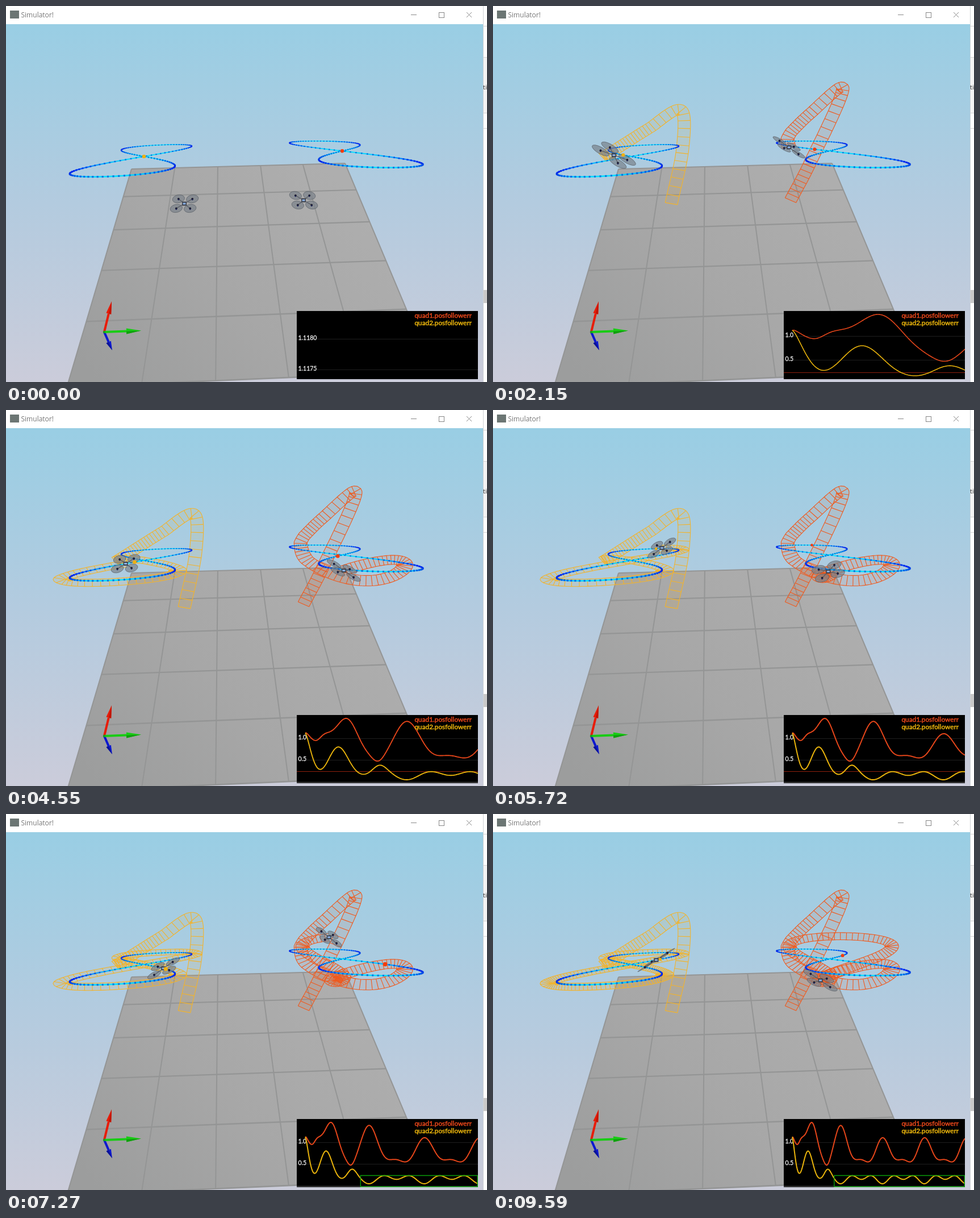
An HTML page with a canvas for the animation above (9.68 s loop, 847x662 px).

```html
<!DOCTYPE html>
<html lang="en">
<head>
<meta charset="utf-8">
<title>Simulator!</title>
<style>
html, body { margin: 0; width: 100%; height: 100%; overflow: hidden; background: #fff; }
canvas { display: block; width: 847px; height: 662px; }
</style>
</head>
<body>
<canvas id="stage" width="847" height="662"></canvas>
<script>
const ctx = document.getElementById('stage').getContext('2d');
const LOOP = 9680, STEP = 77.4, TAU = Math.PI * 2;
const FONT = 'Lato, "Open Sans", sans-serif';
const { sin, cos, exp, abs, min, max, pow, hypot } = Math;

const clamp = (v, lo, hi) => max(lo, min(hi, v));
const mix = (a, b, k) => a + (b - a) * k;
const bump = (t, centre, width) => exp(-(((t - centre) / width) ** 2));
const smooth = (t, from, to) => {
  const k = clamp((t - from) / (to - from), 0, 1);
  return k * k * (3 - 2 * k);
};

// Perspective view of a flat plane: (u, v) to screen x, y and depth w.
const plane = (ox, oy, ux, uy, vx, vy, cu, cv) => (u, v) => {
  const w = 1 + cu * u + cv * v;
  return { x: ox + (ux * u + vx * v) / w, y: oy + (uy * u + vy * v) / w, w };
};
const floor = plane(419.1, 420.1, 237.35, -7.8, -10.75, -174.5, 0.0107, 0.263);

// Figure-eight course and the angle its marker has reached.
const coursePoint = (view, s, size = 1) => view(size * sin(2 * s), size * sin(s));
const phase = t => (76.2 * t / 1000 + 7 * min(1, t / 600)) * TAU / 360;

const rightView = plane(592, 255.3, 71, 0.5, -54.4, -21.9, -0.013, 0.25);
const leftView = plane(243, 264.9, 72.7, -3.1, 39.7, -25.7, 0.013, 0.2645);

const errorAngle = t => TAU * (t - 7340) / 2330;

const quads = [
  {
    color: '#ef5a1e', marker: '#f53c0a', view: rightView, lean: -1, spread: [14, 8],
    climb: [[0, 524, 342], [400, 558, 277], [1000, 616, 145], [1450, 559, 189], [1980, 517, 230]],
    cruise(t) {
      const a = TAU * (t - 4950) / 4650;
      return [
        601.6 + 4 * cos(a) - 63 * sin(a) - 29 * cos(2 * a) + 31 * sin(2 * a),
        255 + 38 * cos(a) + 12 * sin(a) + 85 * bump(t, 2950, 720)];
    },
    settle: 130,
    error(t) {
      const a = errorAngle(t);
      return 0.75 + 0.25 * cos(a) + 0.1 * cos(2 * a) + 0.03 * sin(a)
        + 0.84 * bump(t, 1100, 380) - 0.16 * bump(t, 300, 170)
        + 0.28 * bump(t, 2680, 450) - 0.1 * bump(t, 1930, 200);
    },
    plotColor: '#e6461a', label: 'quad1.posfollowerr', labelY: 549
  },
  {
    color: '#f2b32c', marker: '#f0b010', view: leftView, lean: 1, spread: [15, 5.5],
    climb: [[0, 314, 348], [360, 334, 250], [660, 331, 183], [1000, 277, 214], [1950, 193, 267]],
    cruise(t) {
      const p = coursePoint(leftView, phase(t) - 0.07, 1.07);
      return [p.x, p.y];
    },
    settle: 240,
    error(t) {
      const a = errorAngle(t);
      return 0.165 - 0.05 * cos(a) - 0.065 * cos(2 * a)
        + 0.58 * bump(t, 850, 360) + 0.15 * bump(t, 1960, 250);
    },
    plotColor: '#eab40c', label: 'quad2.posfollowerr', labelY: 562
  }
];

// Smooth curve through a few keys of [time, x, y].
function spline(keys, t) {
  const last = keys[keys.length - 1], i = keys.findIndex(k => k[0] > t);
  if (i < 0) return last.slice(1);
  const a = keys[i - 1], b = keys[i], prev = keys[i - 2] || a, next = keys[i + 1] || b;
  const h = b[0] - a[0], k = (t - a[0]) / h, k2 = k * k, k3 = k2 * k;
  return [1, 2].map(c => {
    const m0 = (b[c] - prev[c]) / (b[0] - prev[0]) * h;
    const m1 = (next[c] - a[c]) / (next[0] - a[0]) * h;
    return (2 * k3 - 3 * k2 + 1) * a[c] + (k3 - 2 * k2 + k) * m0
      + (3 * k2 - 2 * k3) * b[c] + (k3 - k2) * m1;
  });
}

const cruising = t => smooth(t, 1850, 2350);
const depthScale = y => 1 + (y - 265) / 240;

function position(quad, t) {
  t = max(0, t);
  const k = cruising(t), a = spline(quad.climb, t), b = quad.cruise(t);
  return [mix(a[0], b[0], k), mix(a[1], b[1], k)];
}

// Half width of the ribbon: across the direction of flight.
function halfWidth(quad, t) {
  const [x0, y0] = position(quad, t - 30), [x1, y1] = position(quad, t + 30);
  const dx = x1 - x0, dy = y1 - y0, d = hypot(dx, dy) || 1, k = cruising(t);
  const size = mix(1, depthScale((y0 + y1) / 2), k);
  return [
    -dy / d * mix(11, quad.spread[0], k) * size,
    dx / d * mix(9, quad.spread[1], k) * size];
}

// The craft rolls towards its sideways acceleration.
function pose(quad, t) {
  const h = 0.12, x = d => position(quad, t + d * 1000)[0];
  const accel = (x(h) - 2 * x(0) + x(-h)) / (h * h);
  const roll = clamp(accel / 700, -0.72, 0.72) * min(1, t / 800), bend = roll * roll;
  const size = mix(1, depthScale(position(quad, t)[1]), cruising(t));
  const side = 12.2 * size * (1 + 0.5 * bend);
  return [side, side * roll, quad.lean * (2 + 12 * bend), -8.4 * (1 - 1.3 * bend)];
}

// Every error starts at the same value and relaxes into its own curve.
function followError(quad, t) {
  return quad.error(t) + (1.1179 - quad.error(0)) * exp(-pow(t / quad.settle, 1.5));
}

function path(points, closed) {
  ctx.beginPath();
  points.forEach(([x, y]) => ctx.lineTo(x, y));
  if (closed) ctx.closePath();
}
function line(x1, y1, x2, y2, color, width = 1) {
  path([[x1, y1], [x2, y2]]);
  ctx.strokeStyle = color;
  ctx.lineWidth = width;
  ctx.stroke();
}
function rect(x, y, w, h, color) {
  ctx.fillStyle = color;
  ctx.fillRect(x, y, w, h);
}
function disc(x, y, r, color) {
  ctx.beginPath();
  ctx.arc(x, y, r, 0, TAU);
  ctx.fillStyle = color;
  ctx.fill();
}
function text(str, x, y, font, color, align = 'left', weight = 0) {
  ctx.font = font;
  ctx.textAlign = align;
  ctx.fillStyle = ctx.strokeStyle = color;
  ctx.fillText(str, x, y);
  if (weight) {
    ctx.lineWidth = weight;
    ctx.strokeText(str, x, y);
  }
}
function gradient(x1, y1, x2, y2, ...colors) {
  const g = ctx.createLinearGradient(x1, y1, x2, y2);
  colors.forEach((c, i) => g.addColorStop(i / (colors.length - 1), c));
  return g;
}

function drawWindow() {
  rect(0, 0, 847, 662, '#fff');
  rect(7, 8, 16, 14, '#6c7674');
  text('Simulator!', 26.5, 20, '12px "Open Sans", sans-serif', '#777');
  line(713, 15.5, 723, 15.5, '#888');
  ctx.strokeRect(762.5, 11.5, 9, 9);
  line(811, 11, 820, 20, '#888');
  line(820, 11, 811, 20, '#888');
  rect(841, 91, 6, 97, '#f4f4f4');
  for (const y of [35.5, 90.5, 188.5, 215.5]) line(841, y, 847, y, '#d4d4d4');
  rect(841, 500, 6, 23, '#c9c9c9');
  line(840.5, 0, 840.5, 662, '#cfd2d6');
  text('tie', 840, 147, '11px "Open Sans", sans-serif', '#333');
  rect(0, 32, 840, 630, gradient(0, 32, 0, 662, '#99cee4', '#b3cbdf', '#cbccda'));
}

function drawFloor() {
  const at = (a, b) => { const p = floor(a, b); return [p.x, p.y]; };
  path([at(-1, 1), at(1, 1), at(1, -1), at(-1, -1)], true);
  ctx.fillStyle = gradient(560, 280, 160, 660, '#aeaeae', '#a7a7a7', '#9c9d9d');
  ctx.fill();
  for (let i = 0; i < 6; i++) {
    const k = -1 + i * 0.4;
    line(...at(k, -1), ...at(k, 1), '#949595', 2);
    line(...at(-1, k), ...at(1, k), '#949595', 2.3 - k * 0.4);
  }
}

function drawArrow(x, y, color, shade, headWidth, neck) {
  const ox = 173, oy = 574, dx = x - ox, dy = y - oy, d = hypot(dx, dy);
  const nx = -dy / d * headWidth, ny = dx / d * headWidth;
  const hx = ox + dx * neck, hy = oy + dy * neck;
  line(ox, oy, hx, hy, color, 4);
  path([[hx + nx, hy + ny], [x, y], [hx - nx, hy - ny]], true);
  ctx.fillStyle = color;
  ctx.fill();
  path([[hx + nx, hy + ny], [x, y], [hx, hy]], true);
  ctx.fillStyle = shade;
  ctx.fill();
}

function drawAxes() {
  drawArrow(186, 520, '#e81c08', '#c01404', 4.5, 0.6);
  drawArrow(187, 606, '#0c18d0', '#0a1296', 4.5, 0.55);
  drawArrow(238, 571.5, '#18cc14', '#10a00e', 5, 0.6);
  disc(173, 574, 2.2, '#1a9c20');
}

function drawCourse(view) {
  const n = 260;
  for (let i = 0; i < n; i++) {
    const s = i / n * TAU, p = coursePoint(view, s), q = coursePoint(view, s + TAU / n);
    const fast = abs(cos(2 * s)), r = 2.3 / p.w;
    line(p.x, p.y, q.x, q.y, `rgb(0,${40 + 185 * fast},255)`, 1.9 / p.w);
    if (i % 2) rect(p.x - r / 2, p.y - r / 2, r, r, `rgb(0,${30 + 90 * fast},${235 - 10 * fast})`);
  }
}

function drawRibbon(quad, t) {
  const edgeA = [], edgeB = [], rungs = [];
  const add = time => {
    const [x, y] = position(quad, time), [hx, hy] = halfWidth(quad, time);
    edgeA.push([x + hx, y + hy]);
    edgeB.push([x - hx, y - hy]);
  };
  for (let i = 0; i * 18 < t; i++) {
    add(i * 18);
    if (i % 3 === 0) rungs.push([edgeA[i], edgeB[i]]);
  }
  add(t);
  ctx.fillStyle = quad.color;
  ctx.globalAlpha = 0.1;
  for (let i = 1; i < edgeA.length; i++) {
    path([edgeA[i - 1], edgeA[i], edgeB[i], edgeB[i - 1]], true);
    ctx.fill();
  }
  ctx.globalAlpha = 1;
  ctx.strokeStyle = quad.color;
  ctx.lineWidth = 1.1;
  for (const shape of [edgeA, edgeB, ...rungs]) {
    path(shape);
    ctx.stroke();
  }
}

function drawQuad(quad, t) {
  const [x, y] = position(quad, t), [px, py, qx, qy] = pose(quad, t);
  const tips = [[-1, 1], [1, 1], [-1, -1], [1, -1]]
    .map(([a, b]) => [x + a * px + b * qx, y + a * py + b * qy]);
  for (const [cx, cy] of tips) {
    ctx.save();
    ctx.transform(px, py, qx, qy, cx, cy);
    ctx.beginPath();
    ctx.arc(0, 0, 0.86, 0, TAU);
    ctx.restore();
    ctx.fillStyle = 'rgba(122,130,138,0.7)';
    ctx.fill();
    ctx.strokeStyle = 'rgba(84,90,98,0.75)';
    ctx.lineWidth = 0.9;
    ctx.stroke();
  }
  for (const [cx, cy] of tips) {
    line(x, y, cx, cy, '#5a5e66', 1.3);
    disc(cx, cy, 1.9, '#1c1c28');
    rect(cx - 1, cy, 2, 2.5, '#20265c');
  }
  rect(x - 4, y - 3.5, 8, 7, '#3a3e48');
  rect(x - 2.5, y - 1.5, 5, 3, '#8ab0e4');
}

function drawMarker(quad, t) {
  const p = coursePoint(quad.view, phase(t));
  disc(p.x, p.y, 3.2 / pow(p.w, 1.5), quad.marker);
}

function drawPlot(t) {
  const left = 512, top = 537, width = 319, height = 120;
  const n = 240, x0 = 527, x1 = 831, limit = 0.25, settled = 2330;
  const curves = quads.map(q =>
    Array.from({ length: n + 1 }, (_, i) => followError(q, t * i / n)));
  let lo = min(...curves.flat()), hi = max(...curves.flat());
  if (hi - lo < 0.001) {
    const mid = (hi + lo) / 2;
    lo = mid - 0.0005;
    hi = mid + 0.0005;
  }
  const scale = 108 / (hi - lo), yOf = v => 651 - (v - lo) * scale;

  ctx.save();
  ctx.beginPath();
  ctx.rect(left, top, width, height);
  ctx.clip();
  rect(left, top, width, height, '#000');

  const power = pow(10, Math.floor(Math.log10(28 / scale)));
  const step = [1, 2, 5, 10].map(m => m * power).find(s => s * scale >= 28);
  const digits = max(0, -Math.floor(Math.log10(step) + 1e-9));
  for (let k = Math.ceil((lo - 4 / scale) / step); k * step <= hi; k++) {
    const y = Math.round(yOf(k * step)) + 0.5;
    line(left, y, x1, y, k ? '#1e1e1e' : '#5c5c5c');
    if (y < 648) text((k * step).toFixed(digits), 514.5, y + 1, '10.5px ' + FONT, '#eee', 'left', 0.3);
  }

  const limitY = Math.round(yOf(limit)) + 0.5;
  const boxed = t > 5800;
  if (!boxed) line(left, limitY, x1, limitY, '#8e1f0c', 1.2);

  if (t > 40) {
    curves.forEach((values, c) => {
      path(values.map((v, i) => [x0 + (x1 - x0) * i / n, yOf(v)]));
      ctx.strokeStyle = quads[c].plotColor;
      ctx.lineWidth = 1.3 + min(0.7, t / 8000);
      ctx.lineJoin = 'round';
      ctx.stroke();
    });
  }
  if (boxed) {
    const x = x0 + (x1 - x0) * settled / t;
    ctx.strokeStyle = '#0a9c0a';
    ctx.lineWidth = 1.4;
    ctx.strokeRect(x, limitY, x1 - 0.7 - x, 656.3 - limitY);
  }
  for (const q of quads) text(q.label, 820, q.labelY, '11.8px ' + FONT, q.plotColor, 'right', 0.5);
  ctx.restore();
}

function draw(t) {
  drawWindow();
  ctx.save();
  ctx.beginPath();
  ctx.rect(0, 32, 840, 630);
  ctx.clip();
  drawFloor();
  drawAxes();
  for (const q of quads) {
    drawRibbon(q, t);
    drawCourse(q.view);
    drawQuad(q, t);
    drawMarker(q, t);
  }
  drawPlot(t);
  ctx.restore();
}

const begin = performance.now();
function tick() {
  const t = (performance.now() - begin) % LOOP;
  draw(min(124, Math.floor((t + 20) / STEP)) * STEP);
  requestAnimationFrame(tick);
}
tick();
</script>
</body>
</html>
```
